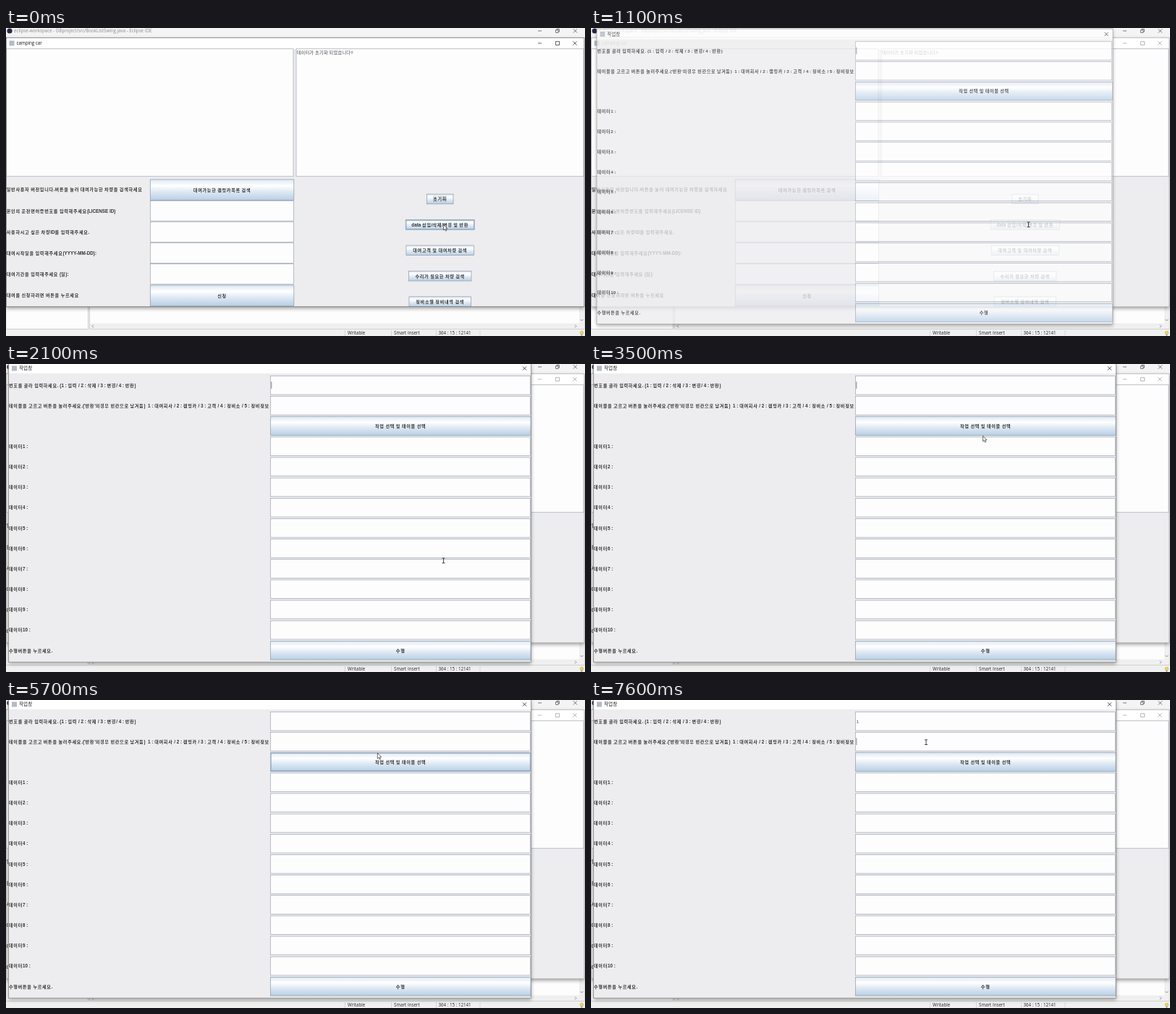
Animation of 800 by 425 pixels, one loop 8 s. Source, as an HTML page:

```html
<!DOCTYPE html>
<html lang="ko">
<head>
<meta charset="utf-8">
<title>camping car</title>
<style>
html, body { margin: 0; width: 100%; height: 100%; overflow: hidden; background: #fff; }
svg { display: block; width: 100vw; height: 100vh; }
text { white-space: pre; }
.label { font: bold 6.3px "Liberation Sans", "Noto Sans CJK KR", sans-serif; fill: #333; }
.label .ko { font-size: 6.1px; letter-spacing: .72px; }
.plain { font: 6.2px "Liberation Sans", "Noto Sans CJK KR", sans-serif; fill: #444; }
.plain .ko { font-size: 6.2px; letter-spacing: .25px; }
.ui { font: 6.2px "Open Sans", "Noto Sans CJK KR", sans-serif; fill: #222; }
.ui .ko { font-size: 6.6px; }
</style>
</head>
<body>
<svg id="stage" viewBox="0 0 800 425" preserveAspectRatio="none">
  <defs>
    <linearGradient id="ocean" x2="0" y2="1">
      <stop offset="0" stop-color="#dde8f3"/>
      <stop offset=".3" stop-color="#fff"/>
      <stop offset=".6" stop-color="#dde8f3"/>
      <stop offset="1" stop-color="#b8cfe5"/>
    </linearGradient>
    <filter id="shadow" x="-5%" y="-5%" width="110%" height="112%">
      <feDropShadow dx="0" dy="2.5" stdDeviation="2.6" flood-opacity=".38"/>
    </filter>
    <clipPath id="mainClip"><rect y="13" width="799" height="371.5"/></clipPath>
    <clipPath id="labelClip"><rect x="3" y="13" width="361" height="397"/></clipPath>
  </defs>
</svg>
<script>
const LOOP = 8000, STEP = 100;
const stage = document.getElementById("stage");
const PANEL = "#edecee", PAPER = "#fefdfe", EDGE = "#8c9aa8";

function add(parent, tag, attrs = {}) {
  const el = document.createElementNS("http://www.w3.org/2000/svg", tag);
  for (const k in attrs) el.setAttribute(k, attrs[k]);
  parent.appendChild(el);
  return el;
}
const show = (el, on) => el.setAttribute("visibility", on ? "visible" : "hidden");
const box = (g, x, y, width, height, fill, more) => add(g, "rect", { x, y, width, height, fill, ...more });
const line = (g, d, stroke, width = 0.6) => add(g, "path", { d, stroke, "stroke-width": width, fill: "none" });

// Hangul and Latin runs have their own font sizes.
function text(g, cls, x, y, str, more) {
  const el = add(g, "text", { class: cls, x, y: y + 2.3, ...more });
  for (const run of str.match(/[가-힣]+|[^가-힣]+/g)) {
    add(el, "tspan", /[가-힣]/.test(run) ? { class: "ko" } : {}).textContent = run;
  }
  return el;
}

function field(g, x, y, w, h) {
  box(g, x, y, w, h, PAPER, { stroke: EDGE, "stroke-width": 0.6 });
}

function button(g, x, y, w, h, str) {
  box(g, x, y, w, h, "url(#ocean)", { stroke: EDGE, "stroke-width": 0.7 });
  const hover = box(g, x + 0.8, y + 0.8, w - 1.6, h - 1.6, "none", { stroke: "#8fa9c4", "stroke-width": 0.9 });
  text(g, "label", x + w / 2, y + h / 2, str, { "text-anchor": "middle" });
  const tw = Math.min(w - 8, str.length * 6);
  const focus = box(g, x + (w - tw) / 2, y + h / 2 - 4, tw, 8, "none", { stroke: "#a3b8cc", "stroke-width": 0.5 });
  show(hover, false);
  show(focus, false);
  return { hover, focus };
}

const cross = (x, y) => `M${x - 2.6} ${y - 2.6}l5.2 5.2m0 -5.2l-5.2 5.2`;

// Editor behind the windows
function buildBackdrop() {
  const g = add(stage, "g");
  box(g, 0, 0, 800, 425, "#f0f0f0");
  box(g, 0, 0, 800, 14, "#f4f4f4");
  add(g, "circle", { cx: 5, cy: 4, r: 3.6, fill: "#2c2545" });
  text(g, "ui", 11, 4, "eclipse-workspace - DBproject/src/BookListSwing.java - Eclipse IDE", { style: "fill:#8a8a8a" });
  line(g, "M735 4h5M759.5 2.8h3.6v3.6h-3.6zM760.8 2.8v-1.3h3.6v3.6h-1.3" + cross(786.5, 4), "#444", 0.7);
  box(g, 0, 380, 113.5, 35.5, PAPER, { stroke: "#b5b5b5", "stroke-width": 0.6 });
  box(g, 115.5, 380, 683.5, 35.5, PAPER, { stroke: "#b5b5b5", "stroke-width": 0.6 });
  box(g, 116, 407.5, 676, 7.6, "#f0f0f0");
  box(g, 792, 380, 6.7, 35, "#f0f0f0");
  line(g, "M121 409.5l-2 2 2 2M786 409.5l2 2-2 2M793.5 402l2 2 2-2", "#777", 0.8);
  line(g, "M468.5 417v8M532.5 417v8M594.5 417v8", "#c4c4c4");
  line(g, "M655 418v6", "#999", 0.7).setAttribute("stroke-dasharray", "1 1.4");
  text(g, "ui", 472, 421, "Writable");
  text(g, "ui", 536, 421, "Smart Insert");
  text(g, "ui", 597.5, 421, "364 : 15 : 12141");
  add(g, "circle", { cx: 795.5, cy: 420.5, r: 2.3, fill: "#f6cf55", stroke: "#b9974a", "stroke-width": 0.4 });
  box(g, 794.5, 422.8, 2, 1.8, "#8694a8");
}

function buildMain() {
  const win = add(stage, "g");
  box(win, 0.3, 13.3, 798.6, 371.2, "#fff", { filter: "url(#shadow)" });
  const g = add(win, "g", { "clip-path": "url(#mainClip)" });
  box(g, 0, 29, 799, 356, PANEL);
  box(g, 4.5, 17.5, 7, 7, "#b3bcc6");
  const title = text(g, "ui", 14.5, 21, "camping car");
  const controls = line(g, "M735 21h5M759.5 18.6h5v5h-5z" + cross(786, 21), "#222", 0.7);
  field(g, 0.7, 28.8, 396.3, 176);
  field(g, 401, 28.8, 397, 176);
  text(g, "plain", 401.5, 34, "데이터가 초기화 되었습니다!!");
  [
    "일반사용자 버전입니다.버튼을 눌러 대여가능한 차량을 검색하세요",
    "본인의 운전면허증번호를 입력해주세요(LICENSE ID)",
    "사용하시고 싶은 차량ID를 입력해주세요.",
    "대여시작일을 입력해주세요(YYYY-MM-DD):",
    "대여기간을 입력해주세요 (일):",
    "대여를 신청하려면 버튼을 누르세요"
  ].forEach((s, i) => text(g, "label", 0.8, 223 + 29.2 * i, s));
  for (let i = 0; i < 4; i++) field(g, 199.3, 238.3 + 29.1 * i, 198, 27.8);
  button(g, 199.3, 209, 198.5, 28.6, "대여가능한 캠핑카목록 검색");
  button(g, 199.3, 355, 198.5, 28.4, "신청");
  const [reset, data] = [
    [36.5, "초기화"],
    [95, "data 삽입/삭제/변경 및 반환"],
    [93.5, "대여고객 및 대여차량 검색"],
    [86.5, "수리가 필요한 차량 검색"],
    [85.5, "정비소별 정비내역 검색"]
  ].map(([w, s], i) => button(g, 599.7 - w / 2, 229.2 + 35.4 * i, w, 13.6, s));
  const frame = box(win, 0.3, 13.3, 798.6, 371.2, "none", { "stroke-width": 0.7 });
  return { title, controls, reset, data, frame };
}

// Rows of the dialog
const PITCH = 28.15, ROW_H = 25.7;
const rowTop = k => 16.4 + PITCH * k;

function buildDialog() {
  const g = add(stage, "g");
  box(g, 3.4, -1.5, 722.2, 412.7, "#fff", { filter: "url(#shadow)" });
  box(g, 3.4, 13, 722.2, 398.2, PANEL);
  box(g, 3.4, -1.5, 722.2, 412.7, "none", { stroke: "#777", "stroke-width": 0.7 });
  box(g, 8, 2.5, 7, 7, "#b3bcc6");
  text(g, "ui", 18, 6, "작업창");
  line(g, cross(716.5, 6), "#222", 0.8);
  const labels = add(g, "g", { "clip-path": "url(#labelClip)" });
  const put = (k, s) => text(labels, "label", 4, rowTop(k) + ROW_H / 2, s);
  put(0, "번호를 골라 입력하세요. (1 : 입력 / 2 : 삭제 / 3 : 변경/ 4 : 반환)");
  put(1, "테이블을 고르고 버튼을 눌러주세요.('반환'의경우 빈칸으로 남겨둠)  1 : 대여회사 / 2 : 캠핑카 / 3 : 고객 / 4 : 정비소 / 5 : 정비정보");
  for (let i = 1; i <= 10; i++) put(i + 2, `데이터${i} :`);
  put(13, "수행버튼을 누르세요.");
  for (let k = 0; k < 13; k++) if (k !== 2) field(g, 365.4, rowTop(k), 358.8, ROW_H);
  const pick = button(g, 365.4, rowTop(2), 359.6, ROW_H, "작업 선택 및 테이블 선택");
  button(g, 365.4, rowTop(13), 359.6, ROW_H, "수행");
  const typed = text(g, "plain", 366.8, 29.2, "1");
  const caret = line(g, "M0 -4.8V4.8", "#555", 0.7);
  return { g, pick, typed, caret };
}

buildBackdrop();
const main = buildMain();
const dialog = buildDialog();
const arrow = add(stage, "path", {
  d: "M0 0V7.6L1.8 6.1 3 8.8 4.2 8.3 3.1 5.6H5.4Z",
  fill: "#fff", stroke: "#111", "stroke-width": 0.6
});
const beam = line(stage, "M-2 -3.3H2M0 -3.3V3.3M-2 3.3H2", "#333", 0.9);

// Pointer: time, x, y
const PATH = [
  [0, 604.5, 271.3], [3000, 604.5, 271.3], [3500, 541.5, 99.2], [3700, 517, 81],
  [4400, 517, 81], [4700, 513.3, 73.2], [6000, 513.3, 73.2], [6100, 511.8, 72],
  [6400, 511.8, 72], [7300, 463, 63], [7600, 463, 58.2], [LOOP, 463, 58.2]
];
const BLINKS = [1100, 1600, 2100, 2600, 3100, 3700, 4200, 4700, 5200, 5700, 6200, 7000, 7500];
const DEACTIVATE = 900, OPEN = 1100, TYPE = 6500, REFOCUS = 7600;

function pointerAt(t) {
  const i = PATH.findIndex(p => p[0] > t);
  const [t0, x0, y0] = PATH[i - 1], [t1, x1, y1] = PATH[i];
  const f = (t - t0) / (t1 - t0);
  return [x0 + (x1 - x0) * f, y0 + (y1 - y0) * f];
}

function rowAt(y) {
  const k = Math.floor((y - rowTop(0)) / PITCH);
  return y - rowTop(k) <= ROW_H ? k : -1;
}

function render(time) {
  const t = Math.floor(time / STEP) * STEP;
  const active = t < DEACTIVATE, open = t >= OPEN;
  main.title.style.fill = active ? "#111" : "#999";
  main.controls.setAttribute("stroke", active ? "#222" : "#999");
  main.frame.setAttribute("stroke", active ? "#666" : "#aaa");
  show(main.reset.focus, active);
  show(main.data.hover, active);
  show(main.data.focus, !active);

  const age = (t - OPEN) / STEP;
  const scale = age < 1 ? 0.9875 : age < 2 ? 0.996 : 1;
  dialog.g.setAttribute("display", open ? "inline" : "none");
  dialog.g.setAttribute("opacity", age < 1 ? 0.78 : age < 2 ? 0.94 : 1);
  dialog.g.setAttribute("transform", `translate(364.5 207) scale(${scale}) translate(-364.5 -207)`);

  const [x, y] = pointerAt(t);
  const row = open ? rowAt(y) : -1;
  const overField = row >= 0 && row !== 2 && row !== 13;
  show(dialog.pick.hover, row === 2);
  show(arrow, !overField);
  show(beam, overField);
  (overField ? beam : arrow).setAttribute("transform", `translate(${x} ${y})`);

  const blink = BLINKS.filter(b => b <= t).length % 2 === 1;
  const moved = t >= REFOCUS;
  show(dialog.typed, t >= TYPE);
  show(dialog.caret, blink);
  dialog.caret.setAttribute("transform",
    `translate(${t >= TYPE && !moved ? 370.6 : 366.8} ${moved ? 57.4 : 29.2})`);
}

const start = performance.now();
function tick() {
  render((performance.now() - start) % LOOP);
  requestAnimationFrame(tick);
}
tick();
</script>
</body>
</html>
```
